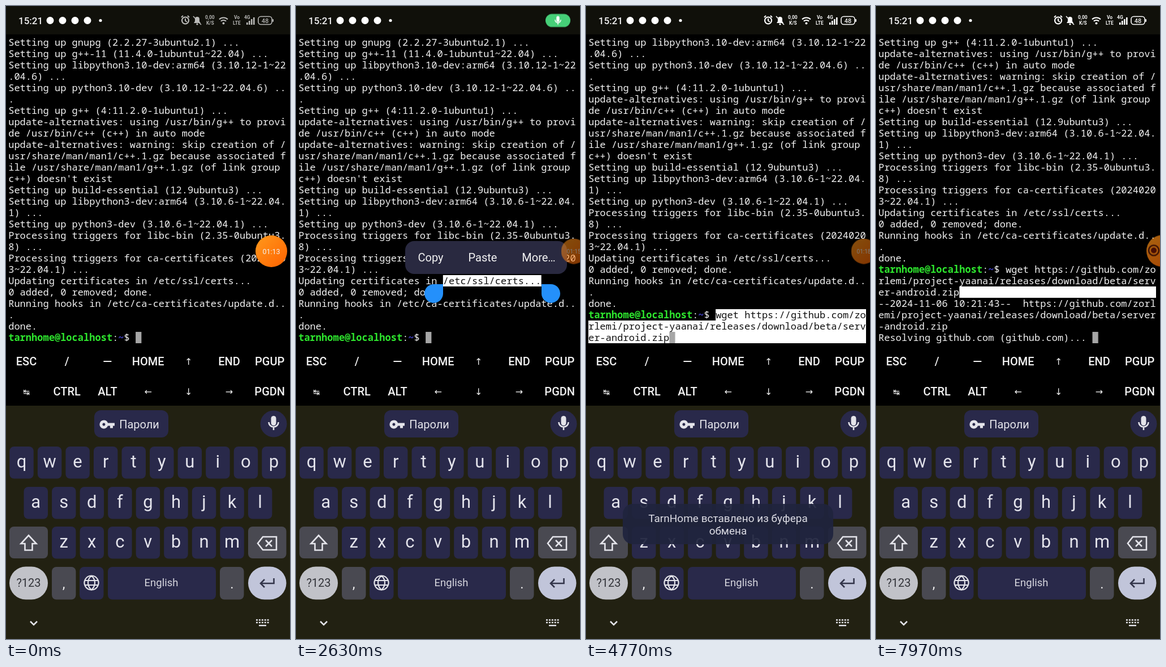
An HTML page that plays this animation: 502 px wide and 1115 px high, repeating every 8 s.

```html
<!DOCTYPE html>
<html lang="en">
<head>
<meta charset="utf-8">
<title>Terminal on a phone</title>
<style>
  html, body { margin: 0; width: 100%; height: 100%; overflow: hidden; background: #000; }
  svg { display: block; }
  text { font-family: Roboto, "Noto Sans", sans-serif; fill: #f2f2f2; white-space: pre; }
  .term text { font: 17.04px "Noto Sans Mono", monospace; }
  .mid { text-anchor: middle; }
  .line { fill: none; stroke: #e4e4ea; stroke-width: 2.6; }
  .white { stroke: #fff; }
</style>
</head>
<body>
<svg id="stage" width="502" height="1115" viewBox="0 0 502 1115"></svg>
<script>
const LOOP = 8000, COL = 10.225, ROW = 20, LEFT = 4.2, TOP = 54, COLS = 48;
const PASTE = 3700, ENTER = 5690, RESOLVE = 6120;
const KEY = '#29294a', GREY_KEY = '#494951', BOARD = '#222112';
const stage = document.getElementById('stage');

// ---- drawing helpers
const rect = (x, y, w, h, fill, r = 0, extra = '') =>
  `<rect x="${x}" y="${y}" width="${w}" height="${h}" rx="${r}" fill="${fill}" ${extra}/>`;
const disc = (x, y, r, fill) => `<circle cx="${x}" cy="${y}" r="${r}" fill="${fill}"/>`;
const path = (d, extra = 'class="line"') => `<path d="${d}" ${extra}/>`;
const label = (s, x, y, size, extra = '') =>
  `<text class="mid" x="${x}" y="${y}" font-size="${size}" ${extra}>${s}</text>`;
const group = (id, body) => `<g id="${id}">${body}</g>`;
const rowY = row => TOP + row * ROW;
const colX = col => LEFT + col * COL;
const cells = (row, col, count, fill) => rect(colX(col), rowY(row), count * COL, ROW, fill);
const print = (s, row, col = 0, extra = '') =>
  `<text x="${colX(col)}" y="${rowY(row) + 16}" ${extra}>${s}</text>`;
const wrap = s => s.match(new RegExp(`.{1,${COLS}}`, 'g'));
const mic = (x, y, k, color) => `<g transform="translate(${x} ${y}) scale(${k})">` +
  rect(-4.5, -13, 9, 17, color, 4.5) +
  path('M-8.5 -2a8.5 8.5 0 0 0 17 0M0 7v5', `fill="none" stroke="${color}" stroke-width="2.6"`) + '</g>';

// ---- terminal
const LOG = `Setting up gnupg (2.2.27-3ubuntu2.1) ...
Setting up g++-11 (11.4.0-1ubuntu1~22.04) ...
Setting up libpython3.10-dev:arm64 (3.10.12-1~22.04.6) ...
Setting up python3.10-dev (3.10.12-1~22.04.6) ...
Setting up g++ (4:11.2.0-1ubuntu1) ...
update-alternatives: using /usr/bin/g++ to provide /usr/bin/c++ (c++) in auto mode
update-alternatives: warning: skip creation of /usr/share/man/man1/c++.1.gz because associated file /usr/share/man/man1/g++.1.gz (of link group c++) doesn't exist
Setting up build-essential (12.9ubuntu3) ...
Setting up libpython3-dev:arm64 (3.10.6-1~22.04.1) ...
Setting up python3-dev (3.10.6-1~22.04.1) ...
Processing triggers for libc-bin (2.35-0ubuntu3.8) ...
Processing triggers for ca-certificates (20240203~22.04.1) ...
Updating certificates in /etc/ssl/certs...
0 added, 0 removed; done.
Running hooks in /etc/ca-certificates/update.d...
done.`.split('\n').flatMap(wrap);
const PROMPT_ROW = LOG.length, PROMPT_COLS = 22;
const URL_TEXT = 'https://github.com/zorlemi/project-yaanai/releases/download/beta/server-android.zip';
const command = wrap(' '.repeat(PROMPT_COLS) + 'wget ' + URL_TEXT);
const request = wrap('--2024-11-06 10:21:43--  ' + URL_TEXT);
const TAIL_ROW = PROMPT_ROW + 2, REPLY_ROW = PROMPT_ROW + 3, LAST_ROW = PROMPT_ROW + 6;
const LINK_ROW = 21, LINK_COL = 25, LINK = '/etc/ssl/certs...';

const prompt = print('<tspan fill="#2ee62e" font-weight="700">tarnhome@localhost</tspan>:' +
  '<tspan fill="#4646d8" font-weight="700">~</tspan>$ ', PROMPT_ROW);

const terminal = group('scroll',
  LOG.map((s, i) => print(s, i)).join('') + prompt +
  group('tail', cells(TAIL_ROW, 14, COLS - 14, '#fff')) +
  group('pasted', cells(PROMPT_ROW, PROMPT_COLS, COLS - PROMPT_COLS, '#fff') +
    cells(PROMPT_ROW + 1, 0, COLS, '#fff') + cells(TAIL_ROW, 0, 14.2, '#fff')) +
  group('command', command.map((s, i) =>
    print(s.trim(), PROMPT_ROW + i, i ? 0 : PROMPT_COLS, 'style="fill:inherit"')).join('')) +
  group('request', request.map((s, i) => print(s, REPLY_ROW + i)).join('')) +
  group('resolve', print('Resolving github.com (github.com)... ', LAST_ROW)) +
  group('cursor', rect(0, 0, COL, ROW, '#a6a6a6')));

const selection =
  group('marked', cells(LINK_ROW, LINK_COL, LINK.length, '#fff') +
    print(LINK, LINK_ROW, LINK_COL, 'style="fill:#111"')) +
  group('leftHandle', path('M260 490v16.5a16.5 16.5 0 1 1 -16.5 -16.5z', 'fill="#2490fb"')) +
  group('rightHandle', path('M434 490v16.5a16.5 16.5 0 1 0 16.5 -16.5z', 'fill="#2490fb"'));

const popup = group('popup', rect(193, 414, 286, 58, '#292940', 16) +
  group('pressed', rect(282, 414, 95, 58, '#53575a')) +
  [['Copy', 238], ['Paste', 330], ['More…', 429]].map(([s, x]) => label(s, x, 450, 20)).join(''));

// ---- status bar
const tiny = (x, y, s) => `<text x="${x}" y="${y}" font-size="8.5" font-weight="700">${s}</text>`;
const statusIcons = group('icons',
  path('M322 19.5a6 6 0 1 0 .1 0zM322 22v4l3 2M315 20l3 -3M329 20l-3 -3', 'class="line white" style="stroke-width:2"') +
  path('M337 30h12l-2 -3v-4a4 4 0 0 0 -8 0v4z', 'fill="#fff"') + disc(343, 32, 1.6, '#fff') +
  path('M336 18l14 15', 'class="line white" style="stroke-width:1.6"') +
  tiny(357, 23, '0,00') + tiny(359, 33, 'K/S') +
  path('M382 23.5a11 11 0 0 1 15 0M384.8 26.8a7 7 0 0 1 9.4 0', 'class="line white" style="stroke-width:2"') +
  disc(389.5, 30.5, 2, '#fff') +
  tiny(408, 23, 'Vo') + tiny(406, 33, 'LTE') + tiny(426, 23, '4G') +
  [0, 1, 2, 3].map(i => rect(430 + i * 4, 29 - i * 3, 2.6, 4 + i * 3, '#fff')).join('') +
  rect(451, 18.5, 24, 14, 'none', 4.5, 'stroke="#fff" stroke-width="1.6"') + rect(476, 23, 2, 5, '#fff', 1) +
  label('48', 463, 29.5, 11, 'font-weight="500"'));

const statusBar = rect(0, 0, 502, 50, '#10100a') +
  '<text x="22" y="32" font-size="17" font-weight="500">15:21</text>' +
  [78, 100, 122, 144].map(x => disc(x, 25.5, 6.5, '#fff')).join('') + disc(167, 25.5, 2.6, '#fff') +
  statusIcons + group('pill', rect(-22, -11.5, 44, 23, '#46cf78', 11.5) + mic(0, 0, .6, '#fff'));

// ---- terminal key rows
const extraKeys = [['ESC', '/', '–', 'HOME', '↑', 'END', 'PGUP'], ['↹', 'CTRL', 'ALT', '←', '↓', '→', 'PGDN']]
  .map((keys, r) => keys.map((s, i) => {
    const x = 36 + i * 71.7, y = 633 + r * 52.5;
    if (s === '–') return rect(x - 7, 625, 14, 2, '#f2f2f2');
    return /[↑↓←→↹]/.test(s)
      ? label(s, x, y - 1, s === '↹' ? 14 : 16, 'style="font-family:DejaVu Sans,sans-serif"')
      : label(s, x, y, 20, 'font-weight="500"');
  }).join('')).join('');

// ---- keyboard
const letterRow = (letters, x, y) => [...letters].map((c, i) => {
  const left = x + i * 49.55;
  return rect(left, y, 42.5, 56.5, KEY, 8) + label(c, left + 21.2, y + 37, 31, 'style="fill:#e4e4ec"');
}).join('');

const keyboard = rect(0, 704, 502, 411, BOARD) +
  rect(156, 712, 131, 48, KEY, 12) +
  path('M173 729.5a7.5 7.5 0 1 0 7 10h4v4h5v-4h3v-5h-12a7.5 7.5 0 0 0 -7 -5zM173 734.5a2.5 2.5 0 1 1 -.1 0z',
    'fill="#e4e4ea" fill-rule="evenodd"') +
  label('Пароли', 235.5, 743.5, 20, 'style="fill:#e4e4ea"') +
  disc(473, 736, 23.5, KEY) + mic(473, 735, 1, '#e4e4ea') +
  letterRow('qwertyuiop', 6.3, 776) + letterRow('asdfghjkl', 31.5, 847) + letterRow('zxcvbnm', 81, 917) +
  rect(6, 917, 68, 56, GREY_KEY, 8) + path('M40 932.5l-13.5 14.5h7v11.5h13v-11.5h7z') +
  rect(428, 917, 67.5, 56, GREY_KEY, 8) + path('M454 935h24v23h-24l-9 -11.5zM459 941l11 11M470 941l-11 11') +
  rect(6, 987.5, 68, 58, '#c1c2c8', 29) + label('?123', 40, 1022.5, 20, 'style="fill:#33343a"') +
  rect(81, 988, 42.5, 57.5, GREY_KEY, 8) + label(',', 102, 1026, 24) +
  rect(130, 988, 42.5, 57.5, KEY, 8) +
  path('M151 1003.5a12.5 12.5 0 1 0 .1 0zM151 1003.5c-8 7 -8 18 0 25c8 -7 8 -18 0 -25M139.5 1012h23M139.5 1020h23',
    'class="line" style="stroke-width:2.2"') +
  rect(180, 988, 191, 57.5, KEY, 8) + label('English', 274.5, 1022, 18.5, 'style="fill:#d6d6de"') +
  rect(378, 988, 42.5, 57.5, GREY_KEY, 8) + label('.', 399.5, 1026, 24) +
  rect(428, 987.5, 67.5, 58, '#c1c5da', 29) +
  path('M473.5 1008v9h-23M457 1010l-7 7l7 7', 'class="line" style="stroke:#33354a"') +
  path('M43 1084l6 6l6 -6') +
  path('M442 1081.5h23M442 1086h23', 'class="line" style="stroke-dasharray:3 1.9"') + rect(447, 1090, 13, 2.4, '#e4e4ea');

const toast = group('toast', rect(65, 877, 372, 71, '#20243e', 18, 'opacity=".93"') +
  label('TarnHome вставлено из буфера', 251, 908.5, 19, 'style="fill:#dcdce4"') +
  label('обмена', 251, 931, 19, 'style="fill:#dcdce4"'));

// ---- floating recorder button
const TICKS = [[13, 0], [14, 1000], [15, 2250], [16, 3250], [17, 3970], [18, 4770]];
const ball = group('ball', disc(0, 0, 28, 'url(#orange)') +
  group('clock', TICKS.map(([s]) => label('01:' + s, 0, 4.5, 12.5, `id="s${s}"`)).join('')) +
  group('dot', '<circle cx="-15" cy="-1" r="9" fill="none" stroke="#5c1c08" stroke-width="2.5"/>' + disc(-15, -1, 5, '#6e1808')));

stage.innerHTML = `<defs>
  <linearGradient id="orange" x2="1" y2="1"><stop stop-color="#ff9a1c"/><stop offset="1" stop-color="#ff6200"/></linearGradient>
  <clipPath id="screen"><rect y="56" width="502" height="540"/></clipPath></defs>` +
  rect(0, 0, 502, 1115, '#000') +
  `<g class="term" clip-path="url(#screen)">${terminal}${selection}</g>` +
  statusBar + extraKeys + keyboard + toast + popup + ball;

// ---- motion: each track is a list of [ms, value]
function track(id, prop, steps, easing = 'linear') {
  const frames = [...steps, [LOOP, steps.at(-1)[1]]]
    .map(([ms, value]) => ({ offset: ms / LOOP, [prop]: value, easing }));
  document.getElementById(id).animate(frames, { duration: LOOP, iterations: Infinity });
}
const jump = (id, prop, steps) => track(id, prop, steps, 'step-end');
const show = (id, from, to = LOOP) => jump(id, 'opacity', [[0, from ? 0 : 1], [from, 1], [to, to < LOOP ? 0 : 1]]);
const move = (x, y, k = 1) => `translate(${x}px, ${y}px) scale(${k})`;
const at = (row, col) => move(colX(col), rowY(row));

jump('scroll', 'transform', [[0, move(0, 0)], [PASTE, move(0, -2 * ROW)], [ENTER, move(0, -6 * ROW)]]);
jump('cursor', 'transform', [[0, at(PROMPT_ROW, PROMPT_COLS)], [PASTE, at(TAIL_ROW, 14)],
  [ENTER, at(LAST_ROW, 0)], [RESOLVE, at(LAST_ROW, 37)]]);
show('pasted', PASTE, ENTER);
show('tail', PASTE);
show('command', PASTE);
jump('command', 'fill', [[0, '#111'], [ENTER, '#f2f2f2']]);
show('request', ENTER);
show('resolve', RESOLVE);

show('marked', 1800, PASTE);
track('leftHandle', 'opacity', [[0, 0], [1800, 0], [1860, 1], [3540, 1], [3600, .85], [3690, 0]]);
track('rightHandle', 'opacity', [[0, 0], [1800, 0], [1860, 1], [3600, 1], [3690, 0]]);
track('popup', 'opacity', [[0, 0], [1900, 0], [2070, .9], [2170, 1], [3640, 1], [3760, 0]]);
track('pressed', 'opacity', [[0, 0], [3450, 0], [3560, 1]]);
track('toast', 'opacity', [[0, 0], [3750, 0], [3950, 1], [7340, 1], [7700, 0]]);

track('icons', 'opacity', [[0, .72], [160, 0], [2850, 0], [3100, 1]]);
track('icons', 'transform', [[0, move(-5, 0)], [160, move(-14, 0)], [2850, move(-14, 0)], [3100, move(0, 0)]]);
track('pill', 'opacity', [[0, 0], [140, 0], [300, 1], [2650, 1], [2850, 0]]);
track('pill', 'transform', [[0, move(463, 25.5, .4)], [140, move(463, 25.5, .4)], [400, move(463, 25.5)],
  [2650, move(463, 25.5)], [2850, move(463, 25.5, .4)]]);

track('ball', 'transform', [[0, move(469, 432)], [1950, move(469, 432)], [2070, move(475, 433, .93)],
  [2350, move(491, 432, .8)], [6200, move(491, 432, .8)], [6440, move(506, 431.5)]]);
track('ball', 'opacity', [[0, 1], [1950, 1], [2070, .62], [2350, .52], [6200, .52], [6440, .66]]);
track('clock', 'opacity', [[0, 1], [6200, 1], [6400, 0]]);
track('dot', 'opacity', [[0, 0], [6200, 0], [6400, 1]]);
TICKS.forEach(([s, from], i) => show('s' + s, from, TICKS[i + 1]?.[1]));
</script>
</body>
</html>
```
